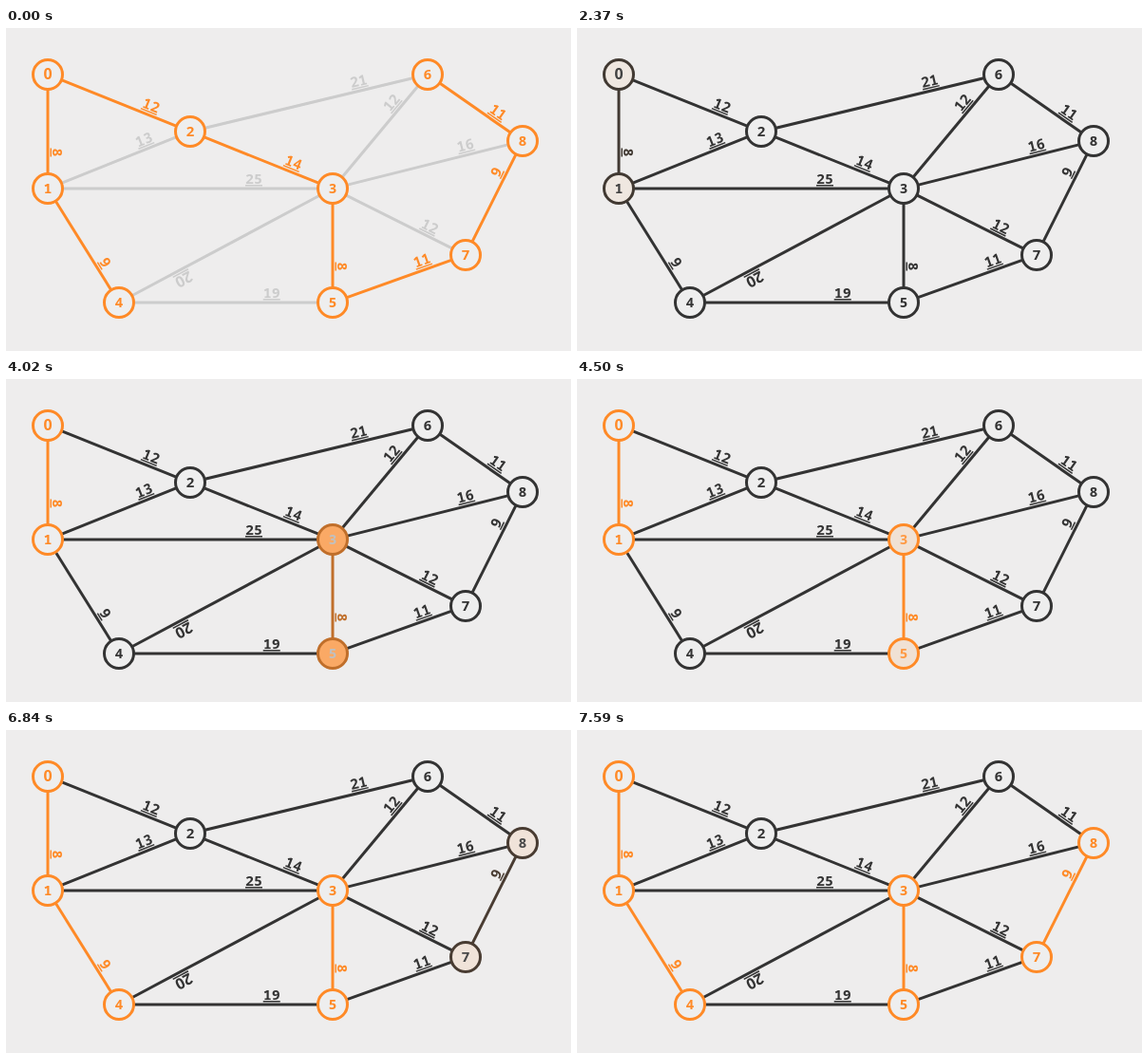
An HTML page for the animation above (8 s loop, 595 by 340 pixels).

```html
<!DOCTYPE html>
<html lang="en">
<head>
<meta charset="utf-8">
<title>Minimum spanning tree</title>
<style>
  html, body { margin: 0; width: 100%; height: 100%; overflow: hidden; background: #eeeded; }
  svg { display: block; }
  text { font: 700 15px "Noto Sans Mono", monospace; text-anchor: middle; }
  .zero { font: 700 16px "Noto Sans", sans-serif; }
  .weight { text-decoration: underline; }
  line, circle { stroke-width: 3; }
</style>
</head>
<body>
<svg id="stage" width="595" height="340" viewBox="0 0 595 340"></svg>
<script>
const LOOP = 8000, STEP = 30, RESET = 1320;
const DARK = [51, 51, 51], PALE = [238, 238, 238], WHITE = [255, 255, 255];
const ORANGE = [255, 138, 39], GREY = [204, 204, 204];

const points = [
  [44, 49], [44, 169], [194, 109], [344, 169], [119, 289],
  [344, 289], [444, 49], [484, 239], [544, 119]
];

// from, to, weight, in the spanning tree
const links = [
  [0, 1, 8, true], [0, 2, 12, true], [1, 2, 13], [1, 3, 25], [1, 4, 9, true],
  [2, 3, 14, true], [2, 6, 21], [3, 4, 20], [3, 5, 8, true], [3, 6, 12],
  [3, 7, 12], [3, 8, 16], [4, 5, 19], [5, 7, 11, true], [6, 8, 11, true],
  [7, 8, 9, true]
];

// Each phase: start, end, progress already made at the start
const picks = [
  { link: '0-1', nodes: [0, 1], on: [2370, 2670, .26], off: [2880, 3120, .08] },
  { link: '3-5', nodes: [3, 5], on: [3870, 4140, .04], off: [4380, 4590, .25] },
  { link: '1-4', nodes: [4], on: [5340, 5640, .2], off: [5850, 6150, .1] },
  { link: '7-8', nodes: [7, 8], on: [6840, 7050, .3], off: [7350, 7590, .15] }
];

const stage = document.getElementById('stage');

function add(tag, attrs, content = '') {
  const el = document.createElementNS('http://www.w3.org/2000/svg', tag);
  for (const key in attrs) el.setAttribute(key, attrs[key]);
  el.textContent = content;
  return stage.appendChild(el);
}

const fontClass = value => String(value).includes('0') ? 'zero' : '';

const edges = links.map(([a, b, weight, inTree]) => {
  const [x1, y1] = points[a], [x2, y2] = points[b];
  const length = Math.hypot(x2 - x1, y2 - y1);
  const angle = Math.atan2(y2 - y1, x2 - x1) * 180 / Math.PI;
  const transform = `translate(${x1} ${y1}) rotate(${angle})`;
  const line = add('line', { x1: 16, x2: length - 16, transform });
  const label = add('text', {
    x: 16 + .75 * (length - 32), y: -5, transform,
    class: 'weight ' + fontClass(weight)
  }, weight);
  return { line, label, inTree, pick: picks.find(p => p.link === `${a}-${b}`) };
});

const nodes = points.map(([cx, cy], i) => ({
  circle: add('circle', { cx, cy, r: 15.5 }),
  label: add('text', { x: cx, y: cy + 5.4, class: fontClass(i) }, i),
  pick: picks.find(p => p.nodes.includes(i))
}));

const ease = t => t < .5 ? 4 * t ** 3 : 1 - 4 * (1 - t) ** 3;

function progress(time, [start, end, first]) {
  if (time < start) return 0;
  return ease(Math.min(1, first + (1 - first) * (time - start) / (end - start)));
}

const mix = (a, b, t) => a.map((v, i) => v + (b[i] - v) * t);
const css = c => `rgb(${c.map(Math.round)})`;

function render(time) {
  time = Math.floor(time / STEP) * STEP;
  const finished = time < RESET;

  for (const { line, label, inTree, pick } of edges) {
    const colour = finished ? (inTree ? ORANGE : GREY)
      : mix(DARK, ORANGE, pick ? progress(time, pick.on) : 0);
    line.setAttribute('stroke', css(colour));
    label.setAttribute('fill', css(colour));
  }

  for (const { circle, label, pick } of nodes) {
    const on = finished ? 1 : pick ? progress(time, pick.on) : 0;
    const off = finished ? 1 : pick ? progress(time, pick.off) : 0;
    circle.setAttribute('stroke', css(mix(DARK, ORANGE, on)));
    circle.setAttribute('fill', css(mix(PALE, ORANGE, on * (1 - off))));
    label.setAttribute('fill', css(mix(mix(DARK, WHITE, on), ORANGE, off)));
  }
}

const begin = performance.now();
function tick() {
  render((performance.now() - begin) % LOOP);
  requestAnimationFrame(tick);
}
tick();
</script>
</body>
</html>
```
